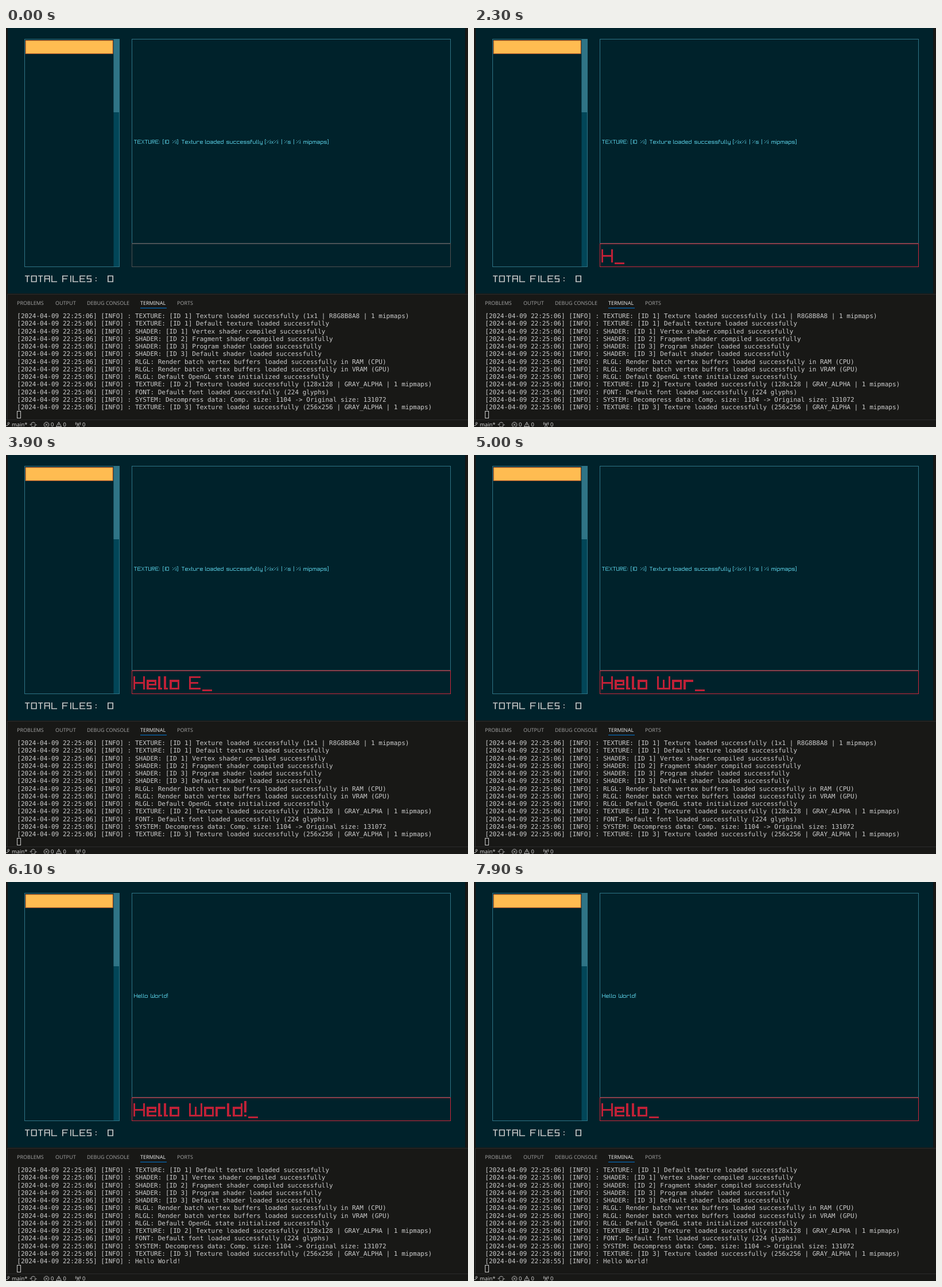
Recreate the animation shown at these times as an HTML page. Size 805 by 696 pixels, loop 8 s.

```html
<!DOCTYPE html>
<html lang="en">
<head>
<meta charset="utf-8">
<title>Log viewer</title>
<style>
  html, body { margin: 0; width: 100%; height: 100%; overflow: hidden; background: #181818; }
  svg { display: block; width: 805px; height: 696px; }
  text { text-rendering: geometricPrecision; white-space: pre; }
  .crisp { shape-rendering: crispEdges; }
  .pixel { fill: none; stroke-width: 1; stroke-linecap: square; }
  .log { font: 11.035px "DejaVu Sans Mono", monospace; fill: #cccccc; }
  .tabs { font: 9px "Noto Sans", sans-serif; fill: #9d9d9d; }
  .status { font: 9.4px "Noto Sans", sans-serif; fill: #cccccc; }
  .icon { fill: none; stroke: #cccccc; stroke-width: 0.9; }
</style>
</head>
<body>
<svg viewBox="0 0 805 696">
  <g class="crisp">
    <rect width="805" height="696" fill="#181816"/>
    <rect x="3" width="797" height="463" fill="#00222b"/>
    <rect x="800" width="1" height="463" fill="#101416"/>
    <path d="M2 464.5H805M2.5 464V683M0 683.5H805" stroke="#2b2b2b" fill="none"/>
    <rect x="32.5" y="19.5" width="165" height="397" fill="none" stroke="#2f7486"/>
    <path d="M219.5 376V19.5H774.5V376" fill="none" stroke="#2f7486"/>
    <path d="M219 375.5H775" stroke="#47565c"/>
    <rect id="field" x="219.5" y="376.5" width="555" height="40" fill="none"/>
  </g>
  <rect x="187.5" y="19" width="10.5" height="398" fill="#024658"/>
  <rect x="187.5" y="19" width="10.5" height="128" fill="#2f7486"/>
  <path class="crisp" d="M197.5 147V417M187 416.5H198" fill="none" stroke="#2f7486"/>
  <rect x="34.2" y="21.9" width="151.8" height="22.8" fill="#ffbc51" stroke="#eb7630"/>

  <g id="total" class="pixel" stroke="#c8c8c8"></g>
  <g id="message" class="pixel" stroke="#51bfd3" stroke-opacity="0.9"></g>
  <g id="input" class="pixel crisp" stroke="#be2137"></g>

  <g class="tabs">
    <text x="19" y="483">PROBLEMS</text>
    <text x="86" y="483">OUTPUT</text>
    <text x="141" y="483">DEBUG CONSOLE</text>
    <text x="234" y="483" fill="#e7e7e7">TERMINAL</text>
    <text x="298" y="483">PORTS</text>
  </g>
  <rect class="crisp" x="234" y="488" width="46" height="1" fill="#0078d4"/>

  <g id="log" class="log"></g>
  <rect class="crisp" x="19.5" y="668.5" width="6" height="12" fill="none" stroke="#cccccc"/>

  <g class="status">
    <text x="10" y="695">main*</text>
    <text x="78" y="695">0</text>
    <text x="99.5" y="695">0</text>
    <text x="133" y="695">0</text>
  </g>
  <g class="icon">
    <circle cx="4.4" cy="689.5" r="1.5"/>
    <path d="M4.4 691Q4 693.5 0 694"/>
    <path d="M43.5 691.5A4 4 0 0 1 51 690M51.5 692.5A4 4 0 0 1 44 694M41.5 691L43.5 693L45.5 691M49.5 693L51.5 691L53.5 693"/>
    <circle cx="70.5" cy="692" r="4.3"/>
    <path d="M68.7 690.2L72.3 693.8M72.3 690.2L68.7 693.8"/>
    <path d="M92 687.5L96.5 695.5H87.5ZM92 690.3V693M92 693.8V694.5"/>
    <path d="M122 687.5Q120.3 690 122 692.5M129 687.5Q130.7 690 129 692.5M124 688.5Q123 690 124 691.5M127 688.5Q128 690 127 691.5M125.5 690L123.5 696M125.5 690L127.5 696"/>
  </g>
</svg>

<script>
const LOOP = 8000;
const $ = id => document.getElementById(id);

// Techno lettering: advance width, then strokes on a unit grid (cap rows 1-7).
const GLYPHS = {
  ' ': '4', _: '6M0 8H4', '!': '2M0 0V5M0 7h0', ':': '2M0 3h0M0 6h0', '|': '2M0 0V8',
  '[': '3M1 0H0V8H1', ']': '3M0 0H1V8H0', '(': '3M1 0H0V8H1', ')': '3M0 0H1V8H0',
  '%': '6M0 2h0M0 6L4 2M4 6h0', 0: '7M0 1H5V7H0Z',
  A: '7M0 7V1H5V7M0 4H5', D: '6M0 1H4V7H0Z', E: '7M5 1H0V7H5M0 4H4', F: '7M0 7V1H5M0 4H4',
  H: '7M0 4H5M0 1V7M5 1V7', I: '3M1 1V7', L: '7M0 1V7H5', O: '7M0 1H5V7H0Z',
  R: '6M0 7V1H4V4H0M3 4V7', S: '6M4 1H0V4H4V7H0', T: '6M0 1H4M2 1V7', U: '6M0 1V7H4V1',
  W: '8M0 1V7H6V1M3 3V7', X: '6M0 1L4 7M4 1L0 7',
  a: '6M0 3H4V7H0V5H4', c: '6M4 3H0V7H4', d: '6M4 1V7H0V3H4', e: '6M4 7H0V3H4V5H0',
  f: '4M2 1H0V7M0 3H2', i: '2M0 1h0M0 3V7', l: '3M0 1V7H1', m: '8M0 7V3H6V7M3 3V7',
  o: '6M0 3H4V7H0Z', p: '6M0 9V3H4V7H0', r: '6M0 7V3H4', s: '6M4 3H0V5H4V7H0',
  t: '3M0 1V7H1M0 3H1', u: '6M0 3V7H4V3', x: '5M0 3L3 7M3 3L0 7', y: '6M0 3V7H4M4 3V9H1'
};

function lettering(word, x, y, unit, gap = 0) {
  let pen = 0.5, out = '';
  for (const ch of word) {
    const glyph = GLYPHS[ch];
    out += `<path d="${glyph.slice(1)}" transform="translate(${pen} .5)"/>`;
    pen += +glyph[0] + gap;
  }
  return `<g aria-label="${word}" transform="translate(${x} ${y}) scale(${unit})">${out}</g>`;
}

const words = (list, y, unit, gap) =>
  list.map(([x, word]) => lettering(word, x, y, unit, gap)).join('');

const TEXTURE_MESSAGE = words([
  [223, 'TEXTURE:'], [273, '[ID'], [290, '%i]'], [306, 'Texture'], [347, 'loaded'],
  [384, 'successfully'], [451, '(%ix%i'], [480, '|'], [485, '%s'], [501, '|'],
  [506, '%i'], [518, 'mipmaps)']
], 194, 1);
const HELLO_MESSAGE = lettering('Hello World!', 223, 194, 1);

const STAMP = '[2024-04-09 22:25:06] [INFO] : ';
const LOG = [
  'TEXTURE: [ID 1] Texture loaded successfully (1x1 | R8G8B8A8 | 1 mipmaps)',
  'TEXTURE: [ID 1] Default texture loaded successfully',
  'SHADER: [ID 1] Vertex shader compiled successfully',
  'SHADER: [ID 2] Fragment shader compiled successfully',
  'SHADER: [ID 3] Program shader loaded successfully',
  'SHADER: [ID 3] Default shader loaded successfully',
  'RLGL: Render batch vertex buffers loaded successfully in RAM (CPU)',
  'RLGL: Render batch vertex buffers loaded successfully in VRAM (GPU)',
  'RLGL: Default OpenGL state initialized successfully',
  'TEXTURE: [ID 2] Texture loaded successfully (128x128 | GRAY_ALPHA | 1 mipmaps)',
  'FONT: Default font loaded successfully (224 glyphs)',
  'SYSTEM: Decompress data: Comp. size: 1104 -> Original size: 131072',
  'TEXTURE: [ID 3] Texture loaded successfully (256x256 | GRAY_ALPHA | 1 mipmaps)'
].map(line => STAMP + line);
LOG.push('[2024-04-09 22:28:55] [INFO] : Hello World!');

const logLines = Array.from({ length: 13 }, (_, row) => {
  const line = document.createElementNS('http://www.w3.org/2000/svg', 'text');
  line.setAttribute('x', 19.3);
  line.setAttribute('y', 506 + 13.25 * row);
  return $('log').appendChild(line);
});

const TYPING = [
  [500, ''], [2300, 'H'], [2600, 'He'], [2800, 'Hel'], [3000, 'Hell'], [3200, 'Hello'],
  [3600, 'Hello '], [3900, 'Hello E'], [4300, 'Hello '], [4500, 'Hello W'],
  [4800, 'Hello Wo'], [5000, 'Hello Wor'], [5100, 'Hello Worl'], [5200, 'Hello World'],
  [5700, 'Hello World!'], [7100, 'Hello World'], [7300, 'Hello Worl'], [7400, 'Hello Wor'],
  [7500, 'Hello Wo'], [7600, 'Hello W'], [7800, 'Hello '], [7900, 'Hello']
];

$('total').innerHTML = words([[33, 'TOTAL'], [98, 'FILES'], [156, ':'], [177, '0']], 430, 5 / 3, 0.4);

let shown = '';
function render(t) {
  const typed = TYPING.filter(([start]) => start <= t).pop();
  const sent = t >= 6000, logged = t >= 6100;
  const state = [typed, sent, logged].join();
  if (state === shown) return;
  shown = state;
  $('field').setAttribute('stroke', typed ? '#cc283a' : '#505050');
  $('input').innerHTML = typed ? lettering(typed[1] + '_', 222, 382.27, 10 / 3) : '';
  $('message').innerHTML = sent ? HELLO_MESSAGE : TEXTURE_MESSAGE;
  logLines.forEach((line, row) => { line.textContent = LOG[row + logged]; });
}

function tick() {
  render(performance.now() % LOOP);
  requestAnimationFrame(tick);
}
tick();
</script>
</body>
</html>
```
